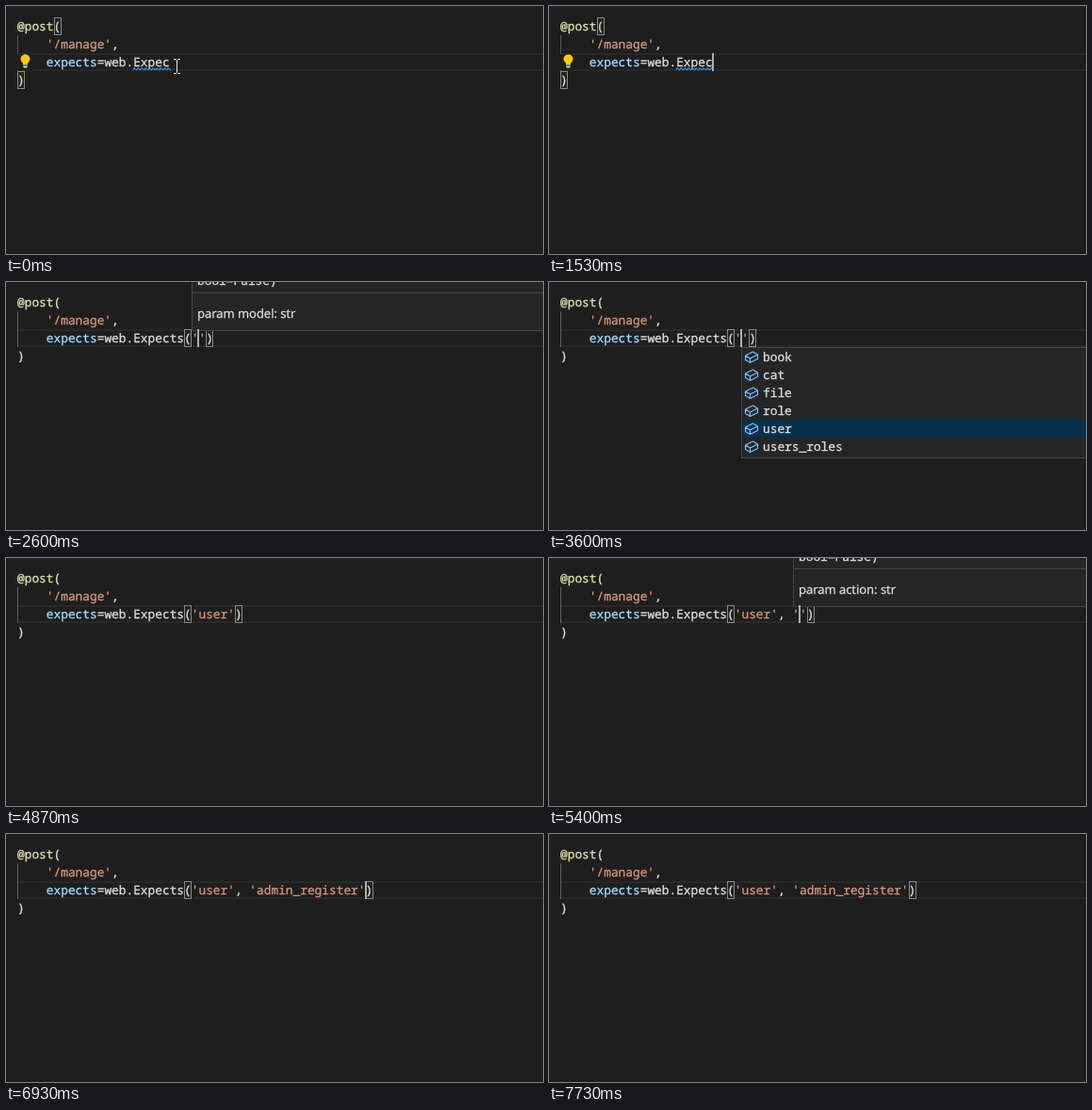
These frames come from a looping animation (570x263 px, 8 s). An HTML page:

```html
<!DOCTYPE html>
<html lang="en">
<head>
<meta charset="utf-8">
<title>Editor completion</title>
<style>
  html, body { margin: 0; width: 100%; height: 100%; overflow: hidden; background: #1e1e1e; }
  svg { display: block; }
  text { font: 12.83px "Noto Sans Mono", monospace; color: #dedede; white-space: pre; text-rendering: geometricPrecision; }
  text, tspan { fill: currentColor; stroke: currentColor; stroke-width: .3; }
  .doc { font: 13px "Open Sans", sans-serif; }
  .str { color: #d6957a; }
  .arg { color: #9cdcfe; }
  .fn { color: #e2e2b0; }
  .panel { fill: #252526; stroke: #454545; }
  .bracket { fill: #1c251c; stroke: #888; }
  .cube { fill: none; stroke: #75beff; stroke-width: 1.2; stroke-linejoin: round; }
  .squiggle { fill: none; stroke: #3f9be8; stroke-width: 1.1; }
</style>
</head>
<body>
<svg id="stage" width="570" height="263" viewBox="0 0 570 263"></svg>
<script>
const LOOP = 8000, LEFT = 12, CHAR = 7.7, LINE = 19, CALL = 23;
const stage = document.getElementById('stage');
const colX = col => LEFT + col * CHAR;
const lineY = line => 12 + line * LINE;

const models = { col: 25, sel: 4, items: ['book', 'cat', 'file', 'role', 'user', 'users_roles'] };
const actions = { col: 33, sel: 0, items: ['admin_register', 'login', 'register'] };
const classes = { col: 16, sel: 0, items: ['Expects'] };

// Each entry changes part of the state from its time (ms) onward.
const events = [
  [0, { code: 'web.Expec', caret: 21, on: 0, bulb: 1, squiggle: 1, mouse: [181, 64] }],
  [70, { mouse: [172, 57] }],
  [130, { mouse: [153, 44] }],
  [200, { mouse: [148, 41] }],
  [270, { mouse: [182, 52] }],
  [330, { mouse: [207, 62] }],
  [530, { on: 1, mouse: [215, 70] }],
  [600, { mouse: [242, 96] }],
  [670, { mouse: [275, 127] }],
  [730, { mouse: null }],
  [1000, { on: 0 }],
  [1530, { on: 1 }],
  [1600, { code: 'web.Expect', caret: 22 }],
  [1670, { list: classes }],
  [1870, { code: 'web.Expects', caret: 23, list: null, squiggle: 0 }],
  [1930, { code: 'web.Expects()', caret: 24 }],
  [2070, { bulb: 0 }],
  [2130, { hint: { col: 24, text: 'param model: str' } }],
  [2400, { on: 0 }],
  [2600, { code: "web.Expects('')", caret: 25, on: 1 }],
  [2670, { list: models }],
  [2730, { hint: null }],
  [3130, { on: 0 }],
  [3600, { on: 1 }],
  [3800, { code: "web.Expects('user')", caret: 29, list: null }],
  [4270, { on: 0 }],
  [4330, { caret: 30, on: 1 }],
  [4870, { on: 0 }],
  [5000, { code: "web.Expects('user',)", caret: 31, on: 1 }],
  [5130, { code: "web.Expects('user', )", caret: 32 }],
  [5200, { hint: { col: 32, text: 'param action: str' } }],
  [5400, { code: "web.Expects('user', '')", caret: 33 }],
  [5470, { hint: null, list: actions }],
  [5870, { on: 0 }],
  [6400, { on: 1 }],
  [6600, { code: "web.Expects('user', 'admin_register')", caret: 47, list: null }],
  [6930, { caret: 48 }],
  [7270, { caret: 49 }],
  [7730, { on: 0 }]
];

const rect = (x, y, w, h, fill) => `<rect x="${x}" y="${y}" width="${w}" height="${h}" fill="${fill}"/>`;
const panel = (x, y, w, h, cls = 'panel') =>
  `<rect class="${cls}" x="${x + .5}" y="${y + .5}" width="${w - 1}" height="${h - 1}"/>`;
const text = (x, y, s, cls = '') => `<text class="${cls}" x="${x}" y="${y}">${s}</text>`;
const span = (cls, s) => `<tspan class="${cls}">${s}</tspan>`;
const codeLine = (line, col, s) => text(colX(col), lineY(line) + 14, s);
const bracket = (line, col) => panel(Math.round(colX(col)), lineY(line), 8, LINE, 'bracket');

function drawList({ col, sel, items }) {
  const x = Math.floor(colX(col)), top = 69;
  return panel(x, top, 400, items.length * LINE + 4) +
    rect(x + 1, top + 1 + sel * LINE, 398, LINE, '#062f4a') +
    items.map((item, i) => {
      const y = top + 1 + i * LINE;
      return `<path class="cube" transform="translate(${x + 11} ${y + 9.5})"
        d="M-6.5-1.5L1.5-5.5L6.5-2.5V2L-1.5 6L-6.5 3ZM-6.5-1.5L-1.5 1.5L6.5-2.5M-1.5 1.5V6"/>` +
        text(x + 23, y + 14, item);
    }).join('');
}

function drawHint({ col, text: doc }) {
  const x = Math.floor(colX(col)) + 1;
  return panel(x, -40, 440, 92) + rect(x + 1, 11, 438, 1, '#454545') +
    text(x + 6, 3, 'bool=False)') + text(x + 6, 38, doc, 'doc');
}

function drawMouse([x, y]) {
  const d = `M${x - 3.5} ${y - 7.5}h2.5l1 1l1-1h2.5M${x} ${y - 6.5}v13M${x - 3.5} ${y + 7.5}h2.5l1-1l1 1h2.5`;
  return `<path d="${d}" transform="translate(.5 0)" fill="none" stroke="#e8e8e8"/>`;
}

const bulb = rect(12, 51, 16, 17, '#1e1e1e') +
  '<path d="M18 62V60.500A5 5 0 1 1 23 60.500V62Z" fill="#fc0"/>' +
  rect(18, 62.5, 5, 1, '#d8d8d8') + rect(18.5, 64, 4, 1.5, '#d8d8d8');

function squiggle() {
  let d = 'M135 67.500';
  for (let i = 0; i < 10; i++) d += 'q1-2.500 2-1t2 1';
  return `<path class="squiggle" d="${d}"/>`;
}

function draw(s) {
  const inner = s.code.endsWith(')');
  const code = s.code.replace(/'[^']*'/g, q => span('str', q));
  stage.innerHTML =
    rect(0, 258, 570, 5, '#1f1c1c') +
    rect(12, 50, 558, 2, '#282828') + rect(12, 67, 558, 2, '#282828') +
    rect(12, 31, 1, 38, inner ? '#606060' : '#555') +
    (inner ? bracket(2, CALL) + bracket(2, 11 + s.code.length) : bracket(0, 5) + bracket(3, 0)) +
    codeLine(0, 0, span('fn', '@post') + '(') +
    codeLine(1, 4, span('str', "'/manage'") + ',') +
    codeLine(2, 4, span('arg', 'expects') + '=' + code) +
    codeLine(3, 0, ')') +
    (s.squiggle ? squiggle() : '') +
    (s.bulb ? bulb : '') +
    (s.hint ? drawHint(s.hint) : '') +
    (s.list ? drawList(s.list) : '') +
    (s.on ? rect(Math.floor(colX(s.caret) - .6), 50, 2, LINE, '#aeafad') : '') +
    (s.mouse ? drawMouse(s.mouse) : '');
}

let shown = -1;
const start = performance.now();
function tick() {
  const t = Math.max(0, performance.now() - start) % LOOP;
  const past = events.filter(([at]) => at <= t);
  if (past.length !== shown) {
    shown = past.length;
    draw(Object.assign({}, ...past.map(e => e[1])));
  }
  requestAnimationFrame(tick);
}
tick();
</script>
</body>
</html>
```
